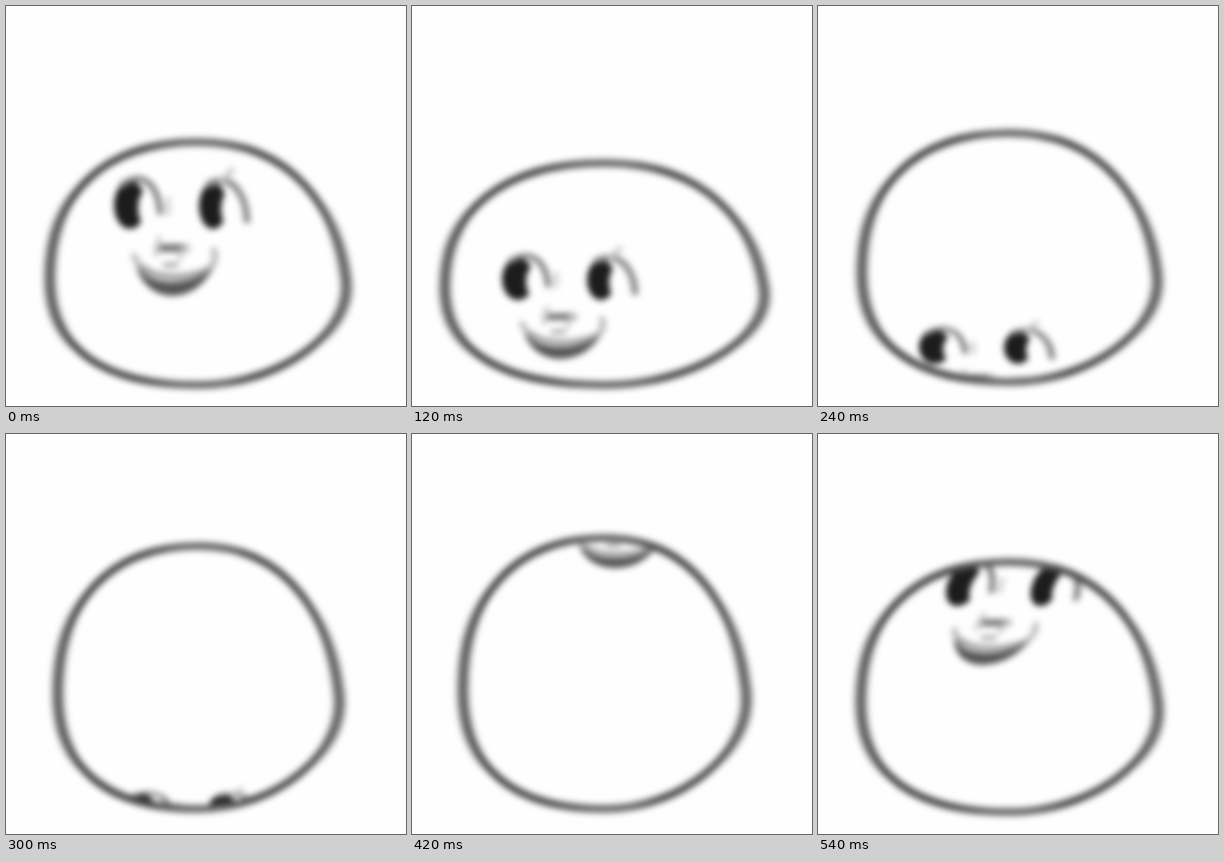
These frames come from a looping animation (400 by 400 pixels, 600 ms). An HTML page with a canvas:

```html
<!DOCTYPE html>
<html lang="en">
<head>
<meta charset="utf-8">
<title>Rolling blob</title>
<style>
  html, body { margin: 0; width: 100%; height: 100%; overflow: hidden; background: #fefefe; }
  canvas { display: block; width: 400px; height: 400px; filter: blur(3.3px); }
</style>
</head>
<body>
<canvas id="stage" width="400" height="400"></canvas>
<script>
const ctx = document.getElementById('stage').getContext('2d');
const PAPER = '#fefefe';
const STEP_MS = 60;

// body: left, top, right, bottom; face: x, y, vertical scale, lean
const poses = [
  { body: [44, 136, 340, 379], face: [124, 199, 1, 0] },
  { body: [38, 150, 347, 379], face: [116, 227, 0.97, 0] },
  { body: [33, 157, 352, 379], face: [106, 273, 0.88, 0] },
  { body: [38, 143, 346, 378], face: [107, 312, 0.8, 0] },
  { body: [44, 127, 339, 376], face: [117, 341, 0.7, 0] },
  { body: [52, 112, 333, 375], face: [134, 372, 0.5, 0] },
  { body: [60, 97, 327, 375], face: [161, 51, 0.6, 0] },
  { body: [51, 104, 334, 375], face: [161, 66, 0.75, 0] },
  { body: [43, 113, 340, 376], face: [159, 87, 0.86, 0] },
  { body: [43, 128, 340, 378], face: [145, 151, 0.88, -0.25] }
];

function bodyPath([left, top, right, bottom]) {
  const path = new Path2D();
  const place = p => p.map((v, i) => i % 2 ? top + v * (bottom - top) : left + v * (right - left));
  path.moveTo(...place([0.5, 0]));
  path.bezierCurveTo(...place([0.83, 0, 0.97, 0.29, 1, 0.57]));
  path.bezierCurveTo(...place([1.02, 0.78, 0.78, 1, 0.5, 1]));
  path.bezierCurveTo(...place([0.18, 1, 0, 0.85, 0, 0.56]));
  path.bezierCurveTo(...place([0, 0.23, 0.17, 0, 0.5, 0]));
  path.closePath();
  return path;
}

function line(d, color, width) {
  ctx.strokeStyle = color;
  ctx.lineWidth = width;
  ctx.stroke(new Path2D(d));
}

function oval(x, y, rx, ry, color) {
  ctx.fillStyle = color;
  ctx.beginPath();
  ctx.ellipse(x, y, rx, ry, 0, 0, Math.PI * 2);
  ctx.fill();
}

function eye(x, y, rx, ry) {
  oval(x, y, rx, ry, '#1c1c1c');
  oval(x + 17, y + 3, 9, 18, PAPER);
}

function drawFace([x, y, scale, lean]) {
  ctx.save();
  ctx.transform(1, 0, lean, scale, x, y);
  ctx.lineCap = 'round';

  eye(0, 0, 16, 24);
  line('M-8 -20 Q8 -32 20 -21 Q29 -11 30 7', '#808080', 6);
  line('M38 -6 L38 8', '#d0d0d0', 5);

  eye(83, 1, 14, 23);
  line('M79 -21 Q96 -29 106 -17 Q116 -6 117 15', '#8c8c8c', 7);
  line('M92 -24 L102 -35', '#c4c4c4', 5);

  line('M28 43 H55', '#757575', 8);
  line('M29 33 L26 50 M55 42 L49 54', '#cfcfcf', 5);
  line('M35 60 H46', '#a8a8a8', 5);
  line('M4 51 Q8 62 18 65 M84 45 Q88 58 76 67', '#bbb', 6);
  line('M10 63 Q42 80 80 64', '#a0a0a0', 6);

  ctx.fillStyle = '#555';
  ctx.fill(new Path2D('M6 62 Q16 90 42 91 Q68 90 82 65 Q62 77 42 77 Q20 77 6 62 Z'));
  ctx.restore();
}

function fadeAcross(left, right, stops) {
  const fade = ctx.createLinearGradient(left, 0, right, 0);
  stops.forEach(([at, color]) => fade.addColorStop(at, color));
  return fade;
}

function drawBody(path, [left, , right]) {
  const dark = '#464646';
  ctx.strokeStyle = fadeAcross(left, right,
    [[0, dark], [0.3, dark], [0.45, '#626262'], [0.58, '#626262'], [0.7, dark], [1, '#555']]);
  ctx.lineWidth = 7.5;
  ctx.stroke(path);

  // The outline is softer and heavier at both sides.
  const shade = 'rgba(110,110,110,0.6)';
  const clear = 'rgba(110,110,110,0)';
  ctx.strokeStyle = fadeAcross(left, right,
    [[0, shade], [0.08, clear], [0.92, clear], [1, shade]]);
  ctx.lineWidth = 14;
  ctx.stroke(path);
}

function draw(now) {
  const { body, face } = poses[Math.floor(now / STEP_MS) % poses.length];
  const path = bodyPath(body);
  ctx.fillStyle = PAPER;
  ctx.fillRect(0, 0, 400, 400);
  ctx.save();
  ctx.clip(path);
  drawFace(face);
  ctx.restore();
  drawBody(path, body);
}

const start = performance.now();
function tick() {
  draw(performance.now() - start);
  requestAnimationFrame(tick);
}
tick();
</script>
</body>
</html>
```
